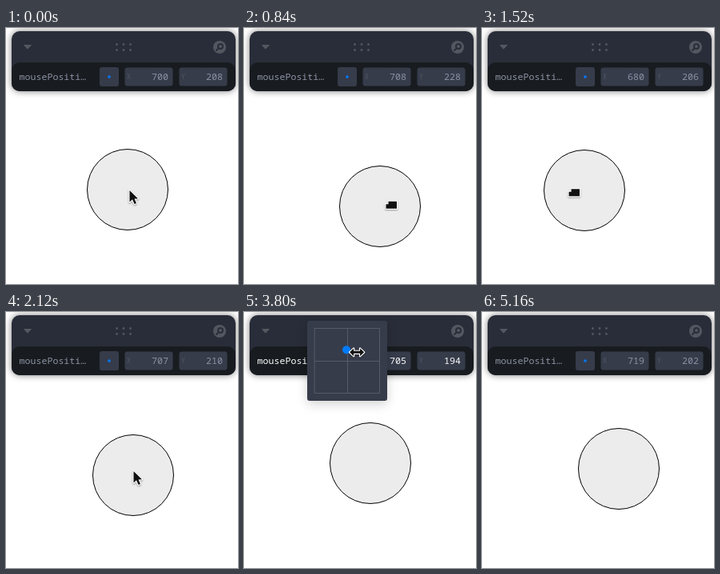
Recreate the animation shown at these times as an HTML page with a canvas. Size 290 by 320 pixels, loop 5280 ms.

```html
<!DOCTYPE html>
<html lang="en">
<head>
<meta charset="utf-8">
<title>Draggable circle with control panel</title>
<style>
  html, body { margin: 0; width: 290px; height: 320px; overflow: hidden; background: #fff; }
  canvas { display: block; width: 290px; height: 320px; }
</style>
</head>
<body>
<canvas id="stage" width="290" height="320"></canvas>
<script>
const ctx = document.getElementById('stage').getContext('2d');
const LOOP = 5280, STEP = 40;
const MONO = '"Noto Sans Mono", "DejaVu Sans Mono", monospace';
const C = {
  header: '#292d39', body: '#181c20', field: '#373c4b', icon: '#535760',
  line: '#565b6a', dim: '#8c92a4', bright: '#fefefe', blue: '#007bff'
};
const GRAB = 120, RELEASE = 2080, POPUP = 2840, POPUP_END = 4440, EXIT = 5080;

// Turning points of each gesture: time, x, y
const circlePath = [
  [120, 152, 202], [260, 160, 188], [630, 120, 202], [800, 160, 222], [840, 170, 223],
  [1080, 206, 202], [1290, 174, 174], [1480, 132, 200], [1520, 128, 203], [1690, 101, 206],
  [2060, 159, 204],
  [3040, 159, 204], [3180, 171, 199], [3400, 151, 208], [3600, 150, 177],
  [3760, 157, 188], [3800, 158, 189], [4060, 172, 221], [4440, 171, 196]
];
const arrowPath = [[2120, 159, 198], [2400, 131, 56], [POPUP_END, 153, 57], [5040, 38, -12]];

// Monotone cubic through the keys on one axis: never overshoots a key.
function sample(keys, axis, t) {
  const last = keys.length - 1;
  if (t <= keys[0][0]) return keys[0][axis];
  if (t >= keys[last][0]) return keys[last][axis];
  let i = 0;
  while (t >= keys[i + 1][0]) i++;
  const slope = k => k < 0 || k >= last ? 0 :
    (keys[k + 1][axis] - keys[k][axis]) / (keys[k + 1][0] - keys[k][0]);
  const tangent = k => {
    const a = slope(k - 1), b = slope(k);
    return a * b > 0 ? 2 * a * b / (a + b) : 0;
  };
  const h = keys[i + 1][0] - keys[i][0], u = (t - keys[i][0]) / h, v = 1 - u;
  const p = keys[i][axis], q = keys[i + 1][axis];
  return p + (q - p) * u * u * (3 - 2 * u) + h * u * v * (v * tangent(i) - u * tangent(i + 1));
}
const at = (keys, t) => ({ x: sample(keys, 1, t), y: sample(keys, 2, t) });

function box(x, y, w, h, r, color) {
  ctx.fillStyle = color;
  ctx.beginPath();
  ctx.roundRect(x, y, w, h, r);
  ctx.fill();
}
function disc(x, y, r, color) {
  ctx.fillStyle = color;
  ctx.beginPath();
  ctx.arc(x, y, r, 0, Math.PI * 2);
  ctx.fill();
}
function poly(points) {
  ctx.beginPath();
  points.forEach(([x, y]) => ctx.lineTo(x, y));
  ctx.closePath();
}
function text(str, x, y, size, color, align = 'left') {
  ctx.font = `${size}px ${MONO}`;
  ctx.textAlign = align;
  ctx.fillStyle = color;
  ctx.fillText(str, x, y);
}
function shadow(color, blur, dy = 0) {
  ctx.shadowColor = color;
  ctx.shadowBlur = blur;
  ctx.shadowOffsetY = dy;
}
const noShadow = () => shadow('transparent', 0);

function drawCircle(c) {
  disc(c.x, c.y, 50.5, '#ececec');
  ctx.strokeStyle = '#000';
  ctx.lineWidth = 1;
  ctx.stroke();
}

function drawField(x, name, value, color) {
  box(x + .5, 49.5, 60, 23, 3, C.field);
  text(name, x + 3, 64, 8, C.icon);
  text(value, x + 55, 65, 11.65, color, 'right');
}

function drawPanel(value, hover) {
  shadow('rgba(0,0,0,.53)', 9);
  box(7, 4, 280, 75, 10, C.header);
  noShadow();
  box(7, 43, 280, 36, 10, C.body);

  ctx.fillStyle = ctx.strokeStyle = C.icon;
  ctx.lineJoin = 'round';
  ctx.lineWidth = 1;
  poly([[22.5, 21.5], [31.5, 21.5], [27, 26]]);
  ctx.fill();
  ctx.stroke();
  for (let i = 0; i < 6; i++) disc(138.5 + (i % 3) * 8.5, i < 3 ? 20.5 : 27.5, 1.4, C.icon);

  disc(267, 24, 8, C.icon);
  ctx.strokeStyle = C.header;
  ctx.lineWidth = 2;
  ctx.lineCap = 'round';
  ctx.beginPath();
  ctx.arc(268, 23, 3, 0, Math.PI * 2);
  ctx.moveTo(265.5, 25.5);
  ctx.lineTo(263, 28);
  ctx.stroke();

  const color = hover ? C.bright : C.dim;
  text('mousePositi…', 16.5, 65, 11.65, color);
  box(117, 49, 24, 24, 3, C.field);
  disc(129, 61, 1.8, C.blue);
  drawField(148, 'X', value.x, color);
  drawField(216, 'Y', value.y, color);
}

function drawPopup(dot) {
  shadow('rgba(0,0,0,.18)', 14, 4);
  box(79, 11, 100, 100, 3, C.field);
  noShadow();
  ctx.strokeStyle = C.line;
  ctx.lineWidth = 1;
  ctx.strokeRect(88.5, 20.5, 81, 81);
  ctx.beginPath();
  ctx.moveTo(129.5, 21);
  ctx.lineTo(129.5, 101);
  ctx.moveTo(89, 61.5);
  ctx.lineTo(169, 61.5);
  ctx.stroke();
  disc(dot.x, dot.y, 5, C.blue);
}

function drawCursor(x, y, points) {
  ctx.save();
  ctx.translate(x, y);
  poly(points);
  ctx.lineJoin = 'round';
  ctx.lineWidth = 2.4;
  ctx.strokeStyle = '#fff';
  shadow('rgba(0,0,0,.35)', 2, 1);
  ctx.stroke();
  noShadow();
  ctx.fillStyle = '#111';
  ctx.fill();
  ctx.restore();
}
const ARROW = [[.5, 1], [.5, 15.5], [4, 12.3], [6.5, 18], [9, 17], [6.5, 11.4], [11, 11.2]];
const FIST = [[-7, -1], [-4, -1], [-4, -4.5], [6.5, -4.5], [6.5, 4.5], [-7, 4.5]];
const HEAD = [[4, -1.5], [4, -4.8], [9, 0], [4, 4.8], [4, 1.5]];
const RESIZE = [...HEAD, ...HEAD.map(([x, y]) => [-x, -y])];

function draw(t) {
  const c = at(circlePath, t), late = at(circlePath, t - STEP);
  const value = { x: Math.round(late.x + 548), y: Math.round(late.y + 6) };
  const popup = t >= POPUP && t < POPUP_END;
  const arrow = at(arrowPath, t);
  const hover = popup || (t > RELEASE && t < EXIT && arrow.y > 3 && arrow.y < 79);

  ctx.fillStyle = '#fff';
  ctx.fillRect(0, 0, 290, 320);
  drawCircle(c);
  drawPanel(value, hover);

  if (popup) {
    const dot = { x: 129 + (c.x - 159) / 1.1, y: 61 + (c.y - 204) / 1.1 };
    const k = Math.min(1, Math.max(0, (t - 3000) / 800));
    drawPopup(dot);
    drawCursor(dot.x + 6 + 7 * k, dot.y - 3 + 6 * k, RESIZE);
  } else if (t < GRAB) {
    drawCursor(154, 202, ARROW);
  } else if (t < RELEASE) {
    // The hand runs ahead of the circle that follows it.
    const hand = at(circlePath, Math.min(t + 70, RELEASE));
    drawCursor(hand.x + .5, hand.y + 1, FIST);
  } else if (t < EXIT) {
    drawCursor(arrow.x, arrow.y, ARROW);
  }
}

const start = performance.now();
function frame() {
  const t = (performance.now() - start) % LOOP;
  draw(Math.min(Math.floor(t / STEP) * STEP, 5160));
  requestAnimationFrame(frame);
}
frame();
</script>
</body>
</html>
```
